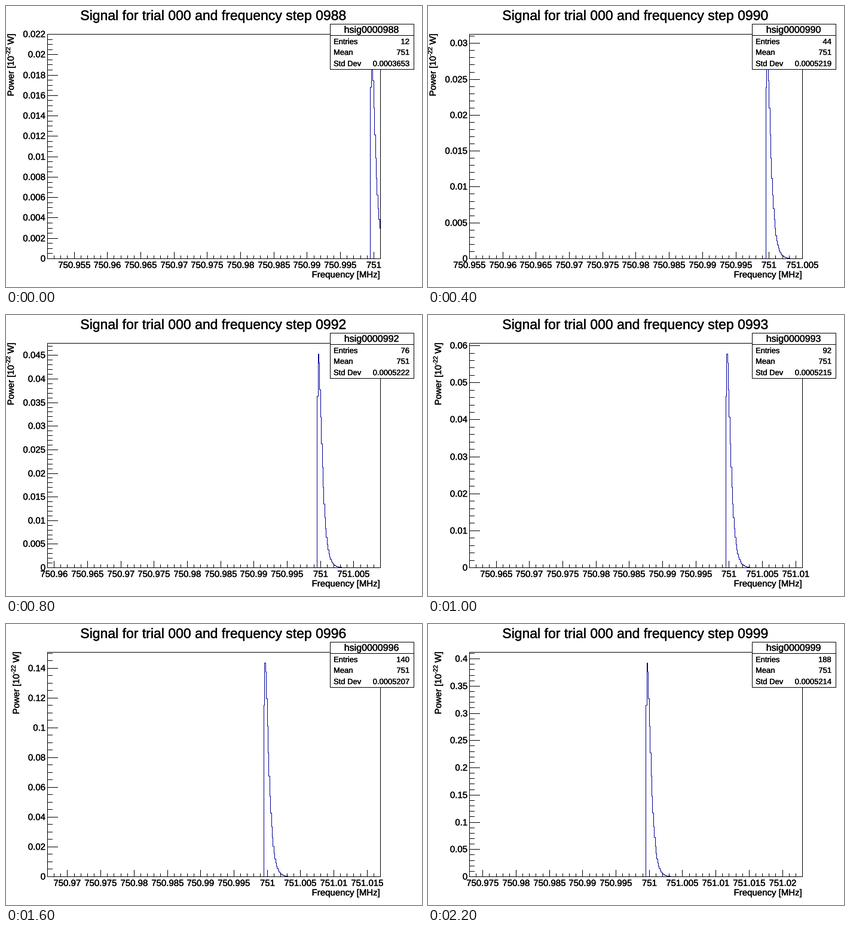
A matplotlib script for the animation above (2400 ms loop, 696x472 px).

```python
import math

import matplotlib.pyplot as plt
import numpy as np
from matplotlib.animation import FuncAnimation
from matplotlib.patches import Rectangle
from matplotlib.patheffects import withStroke

plt.rcParams["font.family"] = "Liberation Sans"
plt.rcParams["path.snap"] = False          # coordinates are already on pixels

W, H, DPI = 696, 472, 100
PX = 72 / DPI                              # one pixel in points
LEFT, RIGHT, TOP, BOTTOM = 69, 626, 47, 424
FIRST_STEP, STEPS = 988, 12
SPAN = 0.05                                # MHz across the plot
BIN = 0.000125                             # MHz per bin
ONSET = 750.9995                           # MHz where the signal begins
BLUE = (0, 0, 0.6)
HEAVIER = [withStroke(linewidth=0.35 * PX, foreground="black")]

# Line shape relative to its peak, continued by a geometric tail.
HEAD = [0.802, 1, 0.957, 0.833, 0.705, 0.579,
        0.471, 0.376, 0.298, 0.234, 0.184, 0.142]
SHAPE = np.array(HEAD + [HEAD[-1] * 0.77 ** k for k in range(1, 177)])
STD_DEV = [3653, 5107, 5219, 5221, 5222, 5215,
           5209, 5208, 5207, 5214, 5214, 5214]

fig = plt.figure(figsize=(W / DPI, H / DPI), dpi=DPI, facecolor="white")
ax = fig.add_axes([0, 0, 1, 1])


def snap(v):
    """Centre of the nearest pixel."""
    return np.floor(np.asarray(v) + 0.5) + 0.5


def text(x, y, s, size, ha="left", rotation=0, z=3):
    ax.text(x, y, s, fontsize=size * PX, ha=ha, va="baseline",
            rotation=rotation, rotation_mode="anchor", zorder=z,
            path_effects=HEAVIER)


def box(x0, y0, x1, y1, fill, z):
    ax.add_patch(Rectangle((x0 + 0.5, y0 + 0.5), x1 - x0, y1 - y0,
                           facecolor="white" if fill else "none",
                           edgecolor="black", lw=PX, zorder=z))


def peak_power(step):
    """Resonance curve of the detector."""
    return 1 / (2.37 + 0.3293 * (999.735 - step) ** 2)


def tick_step(span):
    """Round tick distance and its number of subdivisions."""
    n = 10
    while True:
        raw = span / n
        mag = 10.0 ** math.floor(math.log10(raw))
        m = next(m for m in (1, 2, 5, 10) if raw <= m * mag * (1 + 1e-9))
        if 2 * math.ceil(span / (m * mag)) != 10:
            return m * mag, 4 if m == 2 else 5
        n += 1


def draw_x_axis(low):
    scale = (RIGHT - LEFT) / SPAN
    first = round(low * 1000)
    for k in range(first, first + 51):
        x = snap(LEFT + (k / 1000 - low) * scale)
        major = k % 5 == 0
        ax.vlines(x, BOTTOM - (11 if major else 5), BOTTOM + 1,
                  color="black", lw=PX, zorder=2)
        if major:
            text(x, 440, f"{k / 1000:g}", 15, "center")
    text(626, 456, "Frequency [MHz]", 15, "right")


def draw_y_axis(top):
    step, parts = tick_step(top)
    scale = (BOTTOM - TOP) / top
    for k in range(int(top / step * parts + 1e-6) + 1):
        value = k * step / parts
        y = snap(BOTTOM - value * scale)
        major = k % parts == 0
        ax.hlines(y, LEFT, LEFT + (18 if major else 9),
                  color="black", lw=PX, zorder=2)
        if major:
            text(66.3, y + 4.7, f"{value:.4g}", 15, "right")
    x = 13 if step < 0.0099 else 22        # title moves out for long labels
    text(x, 151.5, "Power [10", 15, rotation=90)
    text(x - 6, 84, "-22", 10.4, rotation=90)
    text(x, 69, " W]", 15, rotation=90)


def draw_signal(low, peak, top, count):
    edges = ONSET + BIN * np.arange(count + 1)
    x = snap(LEFT + (edges - low) * (RIGHT - LEFT) / SPAN)
    y = snap(BOTTOM - SHAPE[:count] * peak / top * (BOTTOM - TOP))
    base = [BOTTOM + 0.5]
    ax.plot(np.repeat(x, 2), np.concatenate([base, np.repeat(y, 2), base]),
            color=BLUE, lw=PX, solid_joinstyle="miter", zorder=1)


def draw_stats(step, count, std):
    box(542, 30, 682, 106, True, 5)
    ax.hlines(49.5, 542, 683, color="black", lw=PX, zorder=6)
    text(611.5, 45, f"hsig{step:07d}", 16, "center", z=6)
    rows = [("Entries", f"{count}"), ("Mean", "751"),
            ("Std Dev", f"{std / 1e7:.7f}")]
    for y, (name, value) in zip((64, 82, 101), rows):
        text(548, y, name, 13, z=6)
        text(675, y, value, 13, "right", z=6)


def update(i):
    ax.clear()
    ax.set_axis_off()
    ax.set_xlim(0, W)
    ax.set_ylim(H, 0)
    step = FIRST_STEP + i
    low = 750.951 + 0.002 * i
    count = 12 + 16 * i
    peak = peak_power(step)
    top = 1.05 * peak
    draw_signal(low, peak, top, count)
    box(LEFT, TOP, RIGHT, BOTTOM, False, 2)
    draw_x_axis(low)
    draw_y_axis(top)
    draw_stats(step, count, STD_DEV[i])
    text(124.3, 23.5, f"Signal for trial 000 and frequency step {step:04d}", 23)
    return []


anim = FuncAnimation(fig, update, frames=STEPS, interval=200, repeat=True)
plt.show()
```
